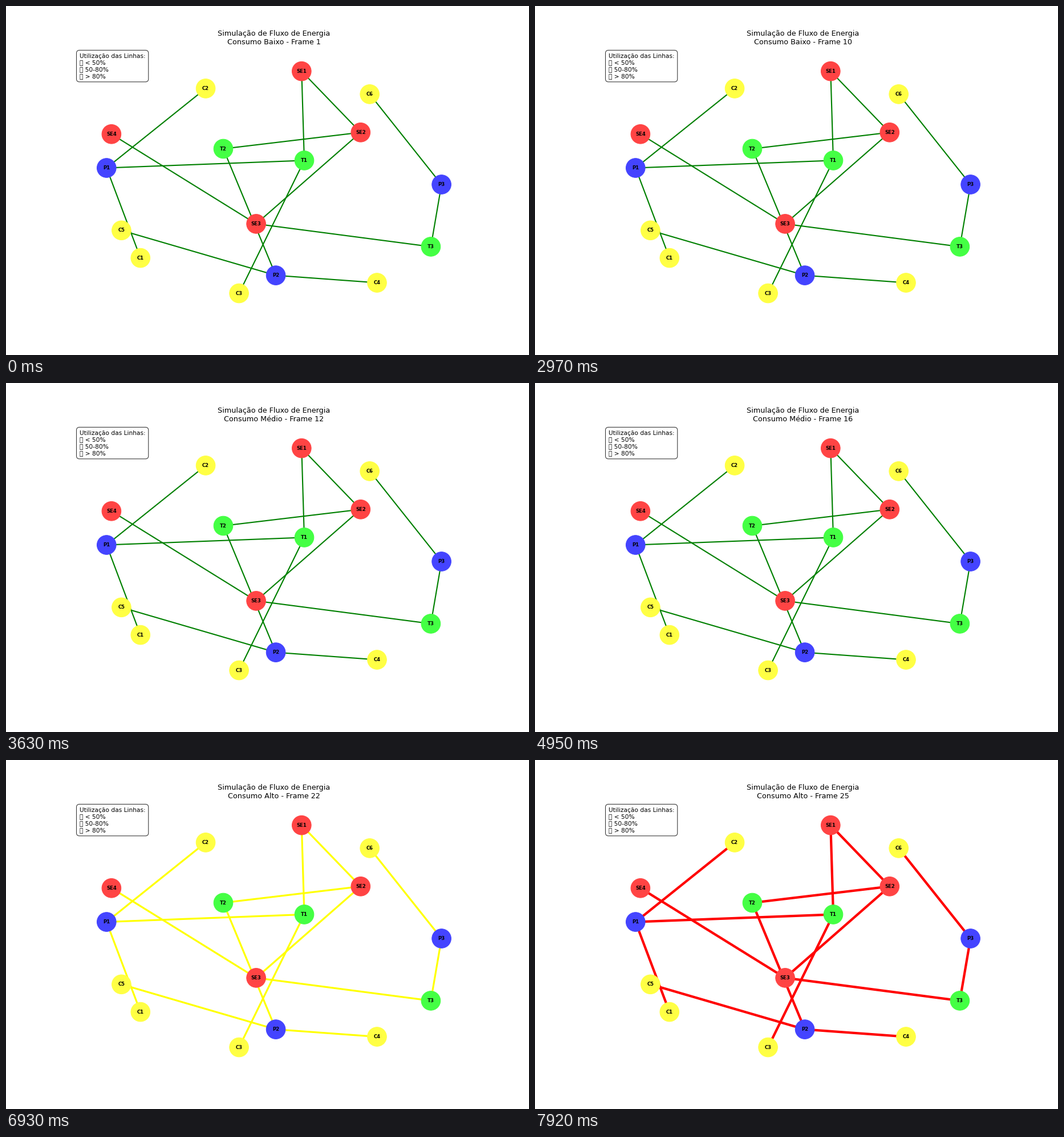
Animation, 917 px wide and 611 px high, one loop 8000 ms. Source, as a matplotlib script:

```python
import matplotlib.pyplot as plt
from matplotlib.animation import FuncAnimation
from matplotlib.collections import LineCollection

W, H, DPI = 917, 611, 64
K = 76.4 / DPI          # point scale of the drawing
LOOP, TICK, STEP = 8000, 20, 330

NODES = {
    "SE1": (518.3, 114.2), "SE2": (621.8, 221.3),
    "SE3": (438.6, 381.4), "SE4": (184.9, 224.3),
    "T1": (523.0, 270.4), "T2": (381.0, 250.0), "T3": (744.9, 421.4),
    "P1": (176.3, 283.5), "P2": (473.1, 471.6), "P3": (763.6, 312.5),
    "C1": (235.8, 441.1), "C2": (350.1, 144.4), "C3": (408.6, 503.0),
    "C4": (650.5, 484.5), "C5": (202.4, 392.8), "C6": (637.7, 154.4),
}
EDGES = ("SE1-SE2 SE2-SE3 SE3-SE4 SE1-T1 SE2-T2 SE3-T3 T1-P1 T2-P2 T3-P3 "
         "P1-C1 P1-C2 T1-C3 P2-C4 P2-C5 P3-C6").split()
KIND_COLORS = {"S": "#ff4444", "T": "#44ff44", "P": "#4444ff", "C": "#ffff44"}
LOADS = {"low": ("green", 2), "mid": ("yellow", 3), "high": ("red", 4)}

plt.rcParams["font.family"] = "DejaVu Sans"
fig, ax = plt.subplots(figsize=(W / DPI, H / DPI), dpi=DPI, facecolor="white")
fig.subplots_adjust(left=0.125, right=0.9, bottom=0.11, top=0.88)
# data units are stage pixels, y pointing down
ax.set_xlim(0.125 * W, 0.9 * W)
ax.set_ylim(0.89 * H, 0.12 * H)
ax.axis("off")

lines = LineCollection([[NODES[n] for n in e.split("-")] for e in EDGES],
                       zorder=1, clip_on=False)
ax.add_collection(lines, autolim=False)

ax.scatter(*zip(*NODES.values()), s=1000 * K ** 2, linewidths=K, zorder=2,
           c=[KIND_COLORS[n[0]] for n in NODES], clip_on=False)
for name, (x, y) in NODES.items():
    ax.text(x, y, name, fontsize=8 * K, weight="bold",
            ha="center", va="center")

ax.text(0.02, 0.98,
        "Utilização das Linhas:\n\U0001F7E2 < 50%\n"
        "\U0001F7E1 50-80%\n\U0001F534 > 80%",
        transform=ax.transAxes, fontsize=10 * K, va="top",
        bbox=dict(boxstyle="round,pad=0.5", facecolor="white",
                  alpha=0.8, linewidth=K))
title = ax.set_title("", fontsize=12 * K, pad=6 * K)


def load_at(step):
    if step >= 22:
        return "high"
    return "mid" if step in (10, 20, 21) else "low"


def update(i):
    step = int((i * TICK + TICK / 2) // STEP)
    level = ("Baixo", "Médio", "Alto")[step // 10]
    title.set_text("Simulação de Fluxo de Energia\n"
                   f"Consumo {level} - Frame {step + 1}")
    color, width = LOADS[load_at(step)]
    lines.set_color(color)
    lines.set_linewidth(width * K)
    return title, lines


anim = FuncAnimation(fig, update, frames=LOOP // TICK, interval=TICK,
                     init_func=lambda: update(0), repeat=True,
                     repeat_delay=0, blit=False)
plt.show()
```
